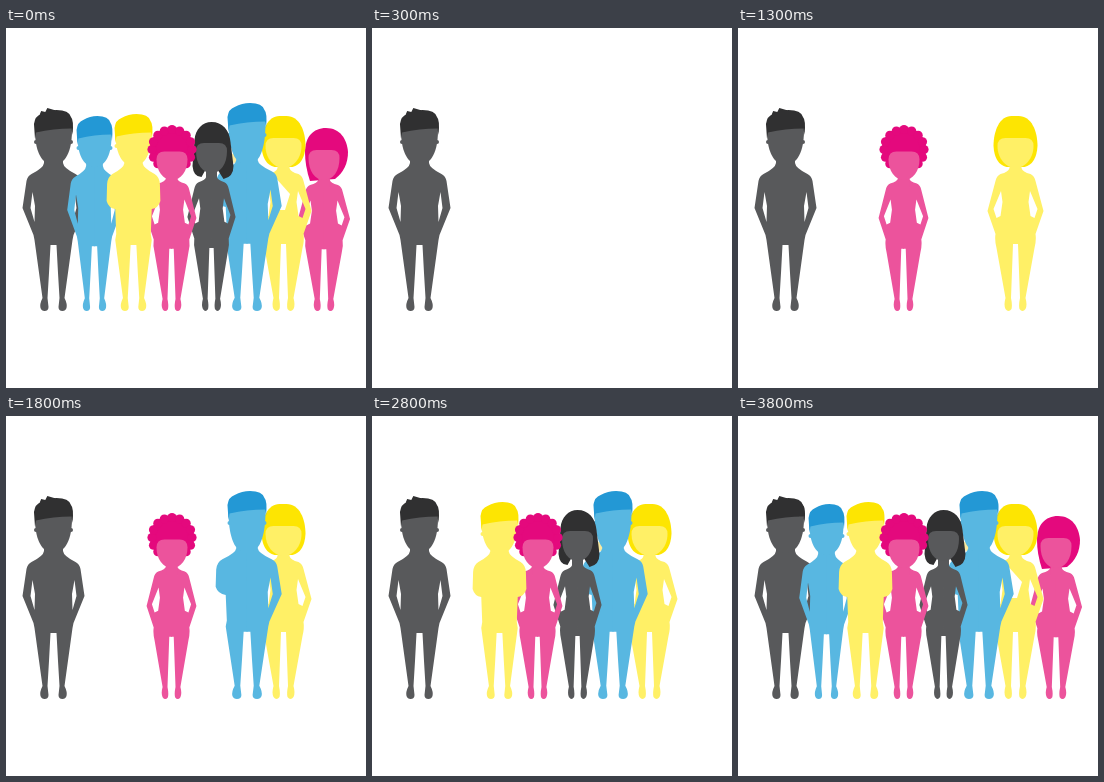
An HTML page for the animation above (4300 ms loop, 360 px wide and 360 px high).

```html
<!DOCTYPE html>
<html>
<head>
<meta charset="utf-8">
<style>
html, body { margin: 0; width: 100%; height: 100%; overflow: hidden; background: #fff; }
svg { display: block; width: 100vw; height: 100vh; }
</style>
</head>
<body>
<svg id="stage" viewBox="0 0 360 360"></svg>
<script>
// [body, hair] colours
const GREY = ['#58595b', '#303031'], BLUE = ['#58b7e1', '#2398d5'],
      YELLOW = ['#fff066', '#fde502'], PINK = ['#ec539c', '#e4097d'];

// Right half of a body, centred on x = 0, feet at y = 283
const manLeg = 'L19 212 L11 270 Q14 276 13 280 Q12 283 9 283 Q5 283 5 279 L6 270 L4.5 245 L3 217 H-.5Z';
const neck = 'M-.5 126 H9.5 V135 Q10 140 22 146 ';
const half = {
  pocket: neck + 'Q26 148 27 153 L31 180 L20 207 ' + manLeg + 'M21 164 L23 180 L19 194 L18.5 178Z',
  fold: neck + 'Q27 149 27.5 156 L28 173 Q26 180 19 181 L18 206 ' + manLeg,
  woman: 'M-.5 130 H6 V140 Q7 144 15 146 Q19 148 20 153 L28 183 L20 206 Q21 212 19 220 L10 270 ' +
    'Q12 277 10 281 Q7 285 4 281 Q3 277 4.5 270 L2.5 216 H-.5Z M14.5 163 L22 181 L19 190 L15 188 L13 174Z'
};

const path = (d, fill) => `<path d="${d}" fill="${fill}" fill-rule="evenodd"/>`;
const circle = (x, y, r, fill) => `<circle cx="${x}" cy="${y}" r="${r}" fill="${fill}"/>`;

function body(colour, left, right, sx, sy) {
  const side = (name, dir) =>
    `<g transform="translate(0 283) scale(${dir * sx} ${sy}) translate(0 -283)">${path(half[name], colour[0])}</g>`;
  return side(left, -1) + side(right, 1);
}

const face = (w, top, chin, fill) => path(
  `M${-w} ${top + 8} Q${-w} ${top} ${8 - w} ${top} H${w - 8} Q${w} ${top} ${w} ${top + 8}` +
  `C${w} ${chin - 9} 9 ${chin} 0 ${chin} C-9 ${chin} ${-w} ${chin - 9} ${-w} ${top + 8}Z`, fill);

function manHead([skin, hair], w, top, chin, flick = '') {
  const ears = circle(1 - w, top + 32, 2, skin) + circle(w - 1, top + 32, 2, skin);
  const cut = 'M-18 29 L-19 14 Q-18 6 -12 4 Q-5 0 3 0 Q15 0 17 7 Q20 10 18.5 25 L17.5 18.5 Q0 18.5 -17 22.5Z' + flick;
  return ears + face(w, top + 12, chin, skin) +
    `<g transform="translate(0 ${top}) scale(${w / 18} 1)">${path(cut, hair).replace('evenodd', 'nonzero')}</g>`;
}

const womanHead = ([skin], hair, w, top, chin) =>
  hair + path(`M-5.5 ${top + 15} H5.5 V${chin + 8} H-5.5Z`, skin) + face(w, top, chin, skin);

function curls(fill) {
  let out = circle(0, 121, 22, fill);
  for (let i = 0; i < 16; i++) {
    const a = i * Math.PI / 8;
    out += circle(20 * Math.cos(a), 121.5 + 20 * Math.sin(a), 4.6, fill);
  }
  return out;
}

const bob = path('M-22 118 C-22 103 -16 88 -4 88 H3 C16 88 22 103 22 118 Q21 136 9 139 H-9 Q-21 136 -22 118Z', YELLOW[1]);
const longHair = path('M-19 138 L-17 112 C-16 101 -9 94 0 94 C11 94 18 102 19 114 L22 138 Q22 149 12 151 L5 140 H-5 L-10 149 Q-18 149 -19 138Z', GREY[1]);
const sweep = path('M-14 153 Q-19 138 -19 124 C-19 109 -11 100 2 100 C16 100 23 111 24 124 Q24 141 11 151Z', PINK[1]);

// [appears at ms, centre x, drawing], back to front
const layers = [
  [3800, 318, body(PINK, 'woman', 'woman', .93, .92) + womanHead(PINK, sweep, 15.5, 122, 152)],
  [800, 277.5, body(YELLOW, 'woman', 'woman', 1, 1) + womanHead(YELLOW, bob, 18, 110, 140)],
  [3800, 0, path('M268 148 L284 166 L279 182 L270 182Z', '#fff')],
  [2300, 229, circle(0, 130, 5, '#f8e9a0')],
  [1800, 241, body(BLUE, 'fold', 'pocket', 1.12, 1.02) + manHead(BLUE, 18.5, 75, 137)],
  [2300, 205.5, body(GREY, 'woman', 'woman', .86, .94) + womanHead(GREY, longHair, 15.5, 115, 145)],
  [1300, 165.5, body(PINK, 'woman', 'woman', .89, .93)],
  [300, 47.5, body(GREY, 'pocket', 'pocket', 1, 1) +
    manHead(GREY, 18.5, 82, 137, 'M-14 6 L-12 1 L-8 2 L-6 -2 L4 1Z')],
  [3300, 88.5, body(BLUE, 'pocket', 'pocket', .88, .98) + manHead(BLUE, 17, 88, 139)],
  [2800, 127.5, body(YELLOW, 'fold', 'fold', .96, 1) + manHead(YELLOW, 18, 86, 138)],
  [1300, 166, womanHead(PINK, curls(PINK[1]), 15.5, 123.5, 152)]
];

const stage = document.getElementById('stage');
stage.innerHTML = layers.map(([, x, art]) => `<g transform="translate(${x} 0)">${art}</g>`).join('');
const groups = [...stage.children];

const start = performance.now();
function draw(now) {
  const t = Math.max(0, now - start) % 4300;
  layers.forEach(([at], i) => {
    groups[i].style.display = t < 100 || t >= at ? '' : 'none';
  });
  requestAnimationFrame(draw);
}
draw(start);
</script>
</body>
</html>
```
